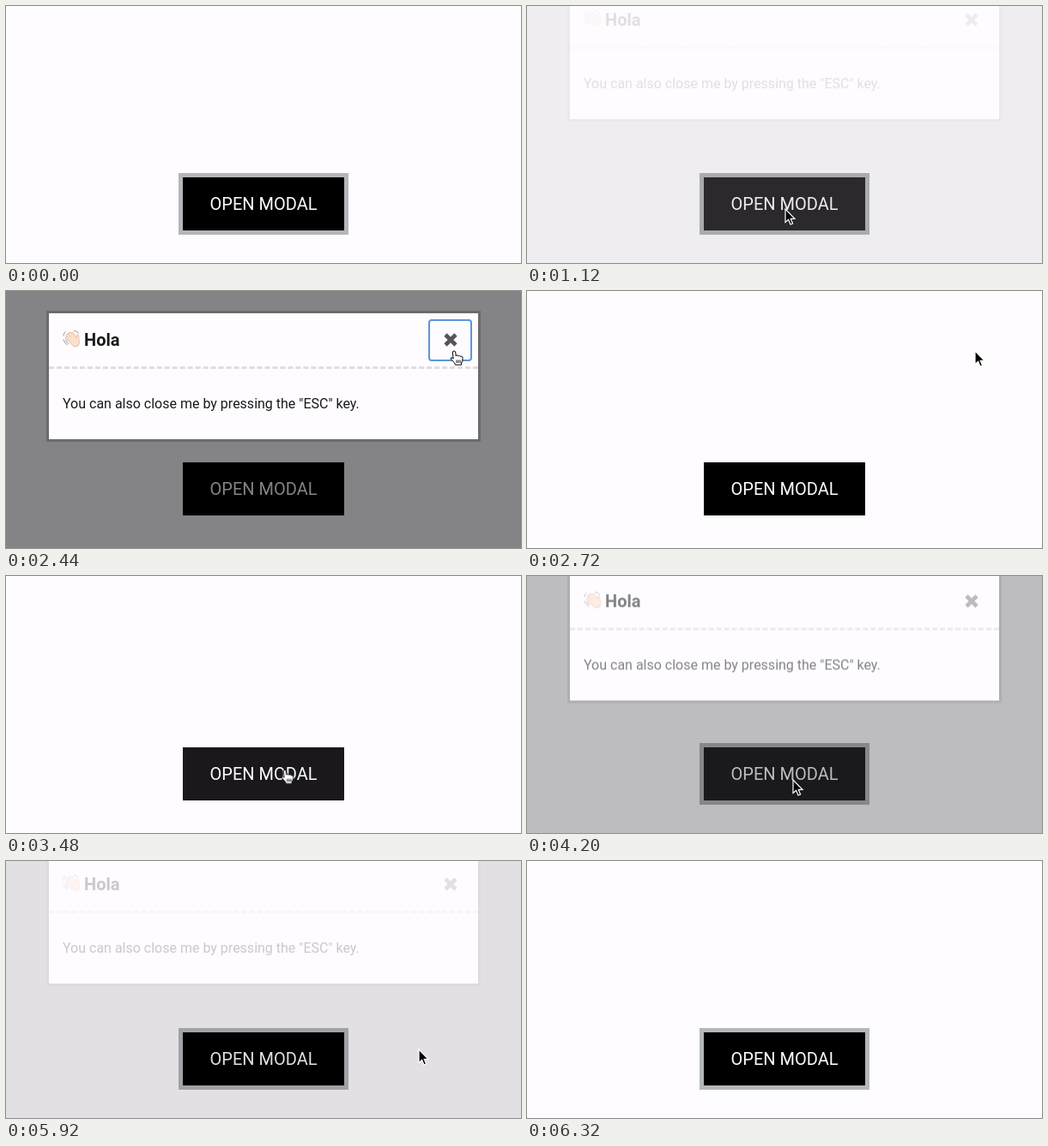
Write an HTML page that moves like this. It is 600 px wide and 300 px high and loops after 7120 ms.

```html
<!DOCTYPE html>
<html lang="en">
<head>
<meta charset="utf-8">
<title>Modal demo</title>
<style>
  :root { --paper: #fefcff; --loop: 7120ms linear infinite; }
  html, body { margin: 0; width: 100%; height: 100%; overflow: hidden; background: var(--paper); }
  body { position: relative; font-family: Roboto, sans-serif; }
  .open, .modal, .modal *, .cursor, .cursor svg { position: absolute; box-sizing: border-box; }

  .open {
    left: 206px; top: 200px; width: 188px; height: 62px;
    font-size: 20px; line-height: 62px; text-align: center; color: var(--paper);
    animation: hover var(--loop), ring 7120ms step-end infinite;
  }

  /* The wide shadow dims the page and fades together with the modal */
  .modal {
    left: 50px; top: 31px; width: 500px; height: 147px;
    background: var(--paper);
    box-shadow: 0 0 0 3px rgba(0, 0, 0, .23), 0 0 0 1000px rgba(0, 0, 0, .535);
    animation: fade var(--loop), slide var(--loop);
  }
  .modal header { left: 0; top: 0; width: 500px; height: 65px; border-bottom: 3px dashed #dcdae0; }
  .modal h1 { margin: 0; left: 41px; top: 19px; font-size: 20px; line-height: 24px; font-weight: 700; }
  .modal p { margin: 0; left: 16px; top: 94px; font-size: 16px; line-height: 24px; white-space: nowrap; }
  .wave { left: 16px; top: 19px; }
  .close { left: 442px; top: 7px; width: 51px; height: 49px; }
  .close i { inset: 0; border: 2px solid #4a8ad8; border-radius: 4px; animation: focus 7120ms step-end infinite; }
  .close svg { left: 18px; top: 16px; animation: darken 7120ms step-end infinite; }

  .cursor { left: 0; top: 0; animation: travel var(--loop), shape 7120ms step-end infinite; }
  .cursor svg { overflow: visible; }
  .hand { left: -5px; top: -1px; opacity: var(--hand); }
  .arrow { left: 0; top: 0; opacity: calc(1 - var(--hand)); }

  @keyframes hover {
    0%, 8.56% { background: #000; }
    10.11%, 15.73% { background: rgb(46, 44, 48); }
    20.22%, 47.75% { background: #000; }
    48.87% { background: rgb(26, 24, 29); }
    50.56%, 56.74% { background: rgb(46, 44, 48); }
    58.98% { background: rgb(36, 34, 39); }
    62.35%, 100% { background: #000; }
  }
  @keyframes ring {
    0%, 56.74%, 100% { box-shadow: 0 0 0 5px #b4b6bc; }
    34.25% { box-shadow: none; }
  }
  @keyframes fade {
    0%, 15.72% { opacity: 0; }
    15.73% { opacity: .115; }
    20.22%, 34.82% { opacity: .9; }
    34.83% { opacity: .6; }
    35.95%, 56.73% { opacity: 0; }
    56.74% { opacity: .115; }
    58.98% { opacity: .48; }
    62.35%, 81.45% { opacity: 1; }
    81.46% { opacity: .85; }
    83.7%, 100% { opacity: 0; }
  }
  @keyframes slide {
    0%, 15.73% { transform: translateY(-46px); }
    16.85% { transform: translateY(-41px); }
    17.97% { transform: translateY(-33px); }
    19.1% { transform: translateY(-17px); }
    20.22%, 34.82% { transform: translateY(-5px); }
    35.95%, 56.74% { transform: translateY(-46px); }
    57.86% { transform: translateY(-41px); }
    58.98% { transform: translateY(-33px); }
    60.11% { transform: translateY(-17px); }
    61.23% { transform: translateY(-5px); }
    62.35%, 81.45% { transform: none; }
    83.7%, 100% { transform: translateY(-46px); }
  }
  @keyframes focus {
    0%, 36%, 100% { opacity: 0; }
    34.25% { opacity: 1; }
  }
  @keyframes darken {
    0%, 36%, 100% { color: #777579; }
    30.2% { color: #434145; }
  }
  @keyframes travel {
    0%, 6.16% { transform: translate(308px, 330px); }
    6.17% { transform: translate(308px, 296px); animation-timing-function: ease-out; }
    10.11% { transform: translate(301px, 237px); }
    24.7% { transform: translate(301px, 237px); animation-timing-function: ease-in-out; }
    32.3% { transform: translate(520px, 75px); }
    34.2%, 43.8% { transform: translate(522px, 70px); }
    48.87% { transform: translate(325px, 226px); animation-timing-function: ease-out; }
    50.56% { transform: translate(310px, 238px); }
    65.7% { transform: translate(310px, 238px); animation-timing-function: ease-in-out; }
    70.2% { transform: translate(481px, 220px); }
    83.7% { transform: translate(481px, 220px); animation-timing-function: ease-in; }
    88.75%, 100% { transform: translate(520px, 330px); }
  }
  @keyframes shape {
    0%, 15.73%, 38.2%, 56.74%, 100% { --hand: 0; }
    8.56%, 30.2%, 47.75% { --hand: 1; }
  }
</style>
</head>
<body>
  <div class="open">OPEN MODAL</div>

  <section class="modal">
    <header>
      <svg class="wave" width="22" height="22" fill="none" stroke-linecap="round" stroke-linejoin="round">
        <defs>
          <path id="palm" d="M10.5 14.5L5 9.8M12 13L5.6 6.6M13 11L8 4.7M14.5 10L11 5M17.4 12.5V7.2M10 13.5L14 10L18 12.5Q18.4 18.5 14.5 18.5Q12 17.5 10 13.5Z"/>
        </defs>
        <use href="#palm" stroke="#d9a58c" stroke-width="3.6"/>
        <use href="#palm" stroke="#fadcc8" fill="#fadcc8" stroke-width="2.4"/>
        <path d="M1 12Q2 16 5.5 18M3.6 12.5Q4.4 15 7 16.4M13.5 1.5Q16.5 1.8 18.4 4M1 7Q1.2 4 3 2.5" stroke="#8b8b92" stroke-width="1"/>
      </svg>
      <h1>Hola</h1>
      <div class="close">
        <i></i>
        <svg width="16" height="16" stroke="currentColor" stroke-width="4.6">
          <path d="M2 2L14 14M14 2L2 14"/>
        </svg>
      </div>
    </header>
    <p>You can also close me by pressing the "ESC" key.</p>
  </section>

  <div class="cursor">
    <svg class="arrow" width="12" height="19">
      <path d="M0 0V15.5L3.6 12.2L6 18L8.6 16.9L6.2 11.3H11Z" fill="#000" stroke="#fff" stroke-width="1.2"/>
    </svg>
    <svg class="hand" width="16" height="18">
      <path d="M5 1Q6.6 1 6.8 3L7.2 7Q7.4 6 8.6 6Q9.8 6 10 7.2Q10.4 6.4 11.4 6.5Q12.5 6.6 12.7 7.8Q13.2 7.2 14 7.4Q15.2 7.8 15.1 9.4Q15.1 13.4 13.5 15V17.2H6.5Q6 14.7 3 12.2Q0 9.5 1.6 8.8Q2.6 8.4 4.2 10L3.3 3Q3.2 1 5 1Z" fill="#fff" stroke="#000"/>
      <path d="M8 11.5V15M10 11.5V15M12 11.5V15" stroke="#000" stroke-width=".9"/>
    </svg>
  </div>
</body>
</html>
```
